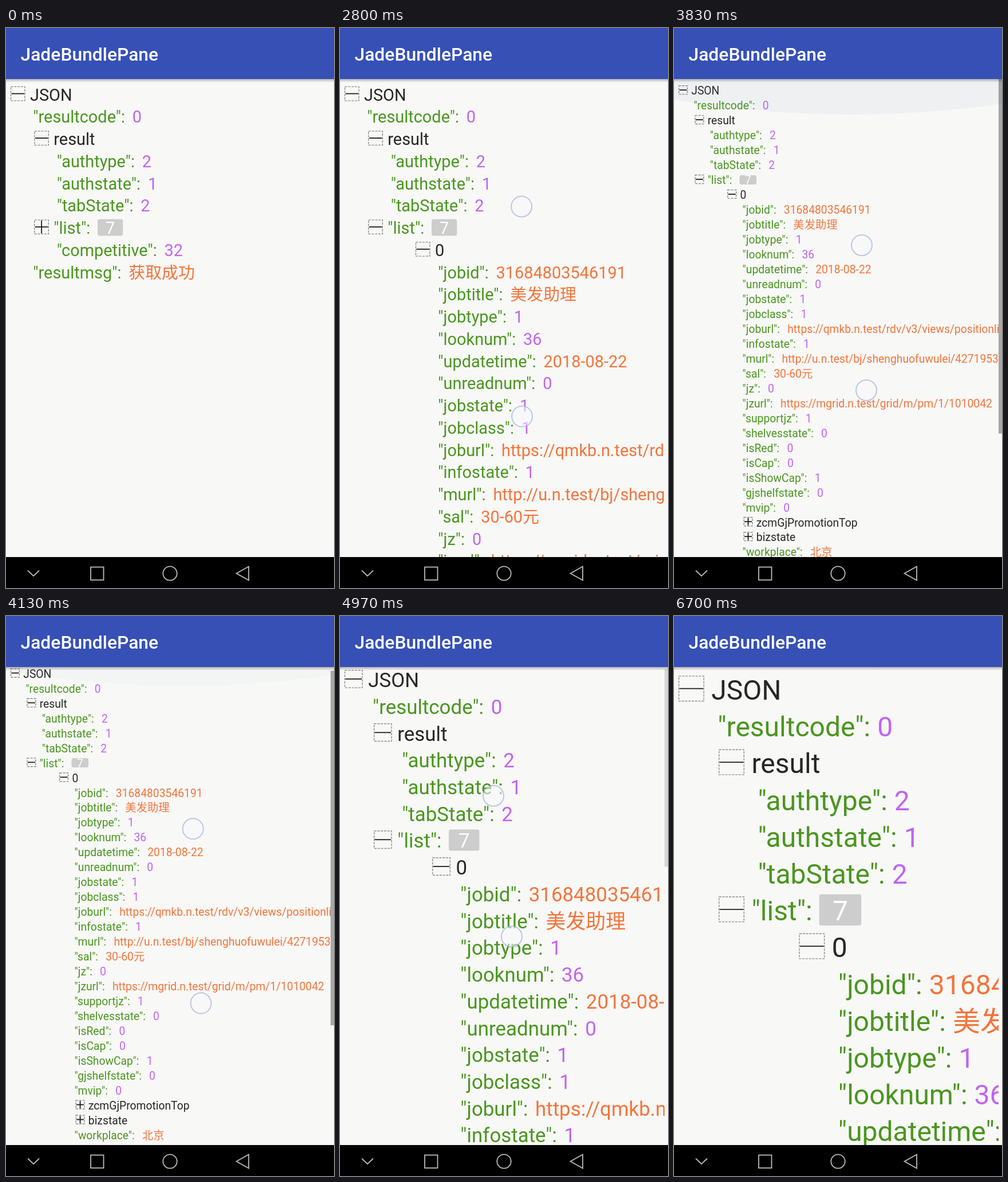
An HTML page with a canvas for the animation above (6.73 s loop, 573x977 px).

```html
<!DOCTYPE html>
<html lang="zh">
<head>
<meta charset="utf-8">
<style>
  html, body { margin: 0; width: 100%; height: 100%; overflow: hidden; background: #f8f8f7; }
  canvas { display: block; }
</style>
</head>
<body>
<canvas id="stage" width="573" height="977"></canvas>
<script>
const c = document.getElementById('stage').getContext('2d');
const LOOP = 6730, WIDTH = 573, TOP = 89, BOTTOM = 923, VIEW = BOTTOM - TOP;
const FACE = 'Roboto, "Noto Sans CJK SC", "Noto Sans CJK", sans-serif';
const GREEN = '#4a961f', PURPLE = '#c163f2', ORANGE = '#f4743a', BLACK = '#272727';
const EXPAND_LIST = 900, EXPAND_ITEM = 1740, ZOOM = 2830;
let t = 0;

// Rows: nodes carry an icon (open or closed), leaves a key and a value
const leaf = (level, key, value) => ({ level, label: `"${key}":`, value });
const node = (level, label, open, badge) => ({ level, label, open, badge, icon: true });
const leaves = (level, data) => Object.entries(data).map(([key, value]) => leaf(level, key, value));

const head = [
  node(0, 'JSON', true),
  leaf(1, 'resultcode', 0),
  node(1, 'result', true),
  ...leaves(2, { authtype: 2, authstate: 1, tabState: 2 })
];
const list = open => node(1, '"list":', open, '7');
const tail = [leaf(2, 'competitive', 32), leaf(1, 'resultmsg', '获取成功')];
const items = Array.from({ length: 7 }, (_, i) => node(3, String(i), false));
const job = leaves(4, {
  jobid: '31684803546191', jobtitle: '美发助理', jobtype: 1, looknum: 36,
  updatetime: '2018-08-22', unreadnum: 0, jobstate: 1, jobclass: 1,
  joburl: 'https://qmkb.n.test/rdv/v3/views/positionlist', infostate: 1,
  murl: 'http://u.n.test/bj/shenghuofuwulei/427195308', sal: '30-60元', jz: 0,
  jzurl: 'https://mgrid.n.test/grid/m/pm/1/1010042', supportjz: 1,
  shelvesstate: 0, isRed: 0, isCap: 0, isShowCap: 1, gjshelfstate: 0, mvip: 0
});

const closed = [...head, list(false), ...tail];
const opened = [...head, list(true), ...items, ...tail];
const detail = [...head, list(true), node(3, '0', true), ...job,
  node(4, 'zcmGjPromotionTop', false), node(4, 'bizstate', false), leaf(4, 'workplace', '北京')];
const DETAIL_ROWS = 43;

// Progress from 0 to 1 between two times, plain or smoothed
const ramp = (a, b) => Math.min(1, Math.max(0, (t - a) / (b - a)));
const ease = (a, b) => { const k = ramp(a, b); return k * k * (3 - 2 * k); };
const pulse = (a, b, rise, fall) => ramp(a, a + rise) * (1 - ramp(b, b + fall));

const fontSize = () =>
  28.9 - 9.6 * ramp(ZOOM, 3600) + 22.95 * ramp(4550, 5170) + 5.75 * ramp(5560, 5900);
const scrollTop = () => 8.7 * ease(3830, 4130) - 8.1 * ease(5550, 5700);

function box(x, y, w, h, color, r = 0) {
  c.fillStyle = color;
  c.beginPath();
  c.roundRect(x, y, w, h, r);
  c.fill();
}

function write(text, x, y, color) {
  c.fillStyle = color;
  c.fillText(text, x, y);
  return x + c.measureText(text).width;
}

function line(points, close) {
  c.beginPath();
  points.forEach(([x, y]) => c.lineTo(x, y));
  if (close) c.closePath();
  c.stroke();
}

function disc(x, y, r) {
  c.beginPath();
  c.arc(x, y, r, 0, 7);
}

function inView(width, draw) {
  c.save();
  c.beginPath();
  c.rect(0, TOP, width, VIEW);
  c.clip();
  draw();
  c.restore();
}

function drawIcon(x, cy, w, open) {
  const y = cy - w / 2, cx = x + w / 2;
  c.lineWidth = 1.4;
  c.strokeStyle = '#8c8c8c';
  c.setLineDash([4, 1.8]);
  c.strokeRect(x + 0.5, y + 0.5, w - 1, w - 1);
  c.setLineDash([]);
  c.lineWidth = 1.8;
  c.strokeStyle = '#1c1c1c';
  line([[x + 1.5, cy], [x + w - 1.5, cy]]);
  if (!open) line([[cx, y + 1.5], [cx, y + w - 1.5]]);
}

function drawRows(rows, size, rowH) {
  const unit = t < ZOOM ? 1.43 * size : 1.456 * size + 0.3;
  const gap = 14 - 0.04 * size;
  c.font = `${size}px ${FACE}`;
  rows.forEach((row, i) => {
    const y = 96 - scrollTop() + i * rowH, mid = y + rowH / 2;
    const base = y + 1.05 * size + 0.2;
    let x = 6 + row.level * unit;
    if (row.icon) {
      drawIcon(x + 2, mid - 0.8, size - 3.4, row.open);
      x += 1.22 * size + 0.7;
    }
    const end = write(row.label, x, base, row.icon && !row.badge ? BLACK : GREEN);
    if (row.badge) {
      const w = 1.53 * size, h = rowH - 9.7;
      box(end + gap, mid - h / 2, w, h, '#cdcdcd', 3.5);
      write(row.badge, end + gap + w / 2 - 0.28 * size, base, '#fff');
    } else if (!row.icon) {
      write(row.value, end + gap, base, typeof row.value === 'number' ? PURPLE : ORANGE);
    }
  });
}

function drawScrollbar(rowH) {
  const k = VIEW / (DETAIL_ROWS * rowH + 8);
  const alpha = pulse(2900, 4800, 100, 300) + pulse(5560, 6350, 50, 250);
  box(567, TOP + scrollTop() * k, 6, VIEW * k, `rgba(0,0,0,${0.33 * alpha})`);
}

function drawGlow() {
  const R = 1860, depth = 62 * ease(2950, 3500) - 45 * ease(3830, 4330);
  disc(310, TOP + depth - R, R);
  c.fillStyle = `rgba(70,115,165,${0.055 * pulse(2950, 3830, 350, 520)})`;
  c.fill();
}

function drawBars() {
  const shade = c.createLinearGradient(0, TOP, 0, TOP + 6);
  shade.addColorStop(0, 'rgba(0,0,0,.28)');
  shade.addColorStop(1, 'rgba(0,0,0,0)');
  box(0, TOP, WIDTH, 6, shade);
  box(0, 0, WIDTH, TOP, '#3650b5');
  c.font = `500 31.8px ${FACE}`;
  write('JadeBundlePane', 25.5, 56.5, '#fff');

  box(0, BOTTOM, WIDTH, 54, '#000');
  c.strokeStyle = '#bababa';
  c.lineWidth = 1.8;
  line([[38, 946.5], [48, 956], [58, 946.5]]);
  c.strokeRect(148, 940.5, 22.5, 22.5);
  disc(286.5, 951.5, 12.2);
  c.stroke();
  line([[402.5, 951.5], [424, 939.5], [424, 963.5]], true);
}

function touch(x, y, start, end) {
  c.globalAlpha = t < start ? 0 : 1 - ramp(end, end + 100);
  c.lineWidth = 2;
  c.strokeStyle = 'rgba(150,168,215,.62)';
  c.fillStyle = 'rgba(250,250,252,.55)';
  disc(x, y, 18);
  c.fill();
  c.stroke();
  c.globalAlpha = 1;
}

// Two fingers moving apart along a steep diagonal
function spread(cx, cy, start, end, from, to) {
  const half = (from + (to - from) * ramp(start, end)) / 2;
  for (const side of [-half, half]) touch(cx + side * 0.13, cy + side, start, end);
}

function drawTouches() {
  touch(62, 350, 730, 860);
  touch(145, 387, 1570, 1700);

  // Pinch together, then ease apart a little
  const close = ease(2750, 3700), part = ease(3830, 4330);
  const x = 317 + 11 * close - 2 * part, y = 311 + 68 * close - 12 * part;
  const gap = 367 - 114 * close + 79 * part;
  touch(x, y, 2650, 4330);
  touch(x + 1 + 7 * close + 9 * part, y + gap, 2650, 4330);

  spread(284, 436.5, 4560, 5270, 150, 315);
  spread(284, 445, 5540, 6150, 180, 400);
}

function frame() {
  t = performance.now() % LOOP;
  const size = fontSize(), rowH = 1.332 * size + 0.26;
  const rows = t < EXPAND_LIST ? closed : t < EXPAND_ITEM ? opened : detail;
  box(0, 0, WIDTH, 977, '#f8f8f7');
  inView(567, () => drawRows(rows, size, rowH));
  inView(WIDTH, drawGlow);
  drawScrollbar(rowH);
  drawBars();
  drawTouches();
  requestAnimationFrame(frame);
}
frame();
</script>
</body>
</html>
```
